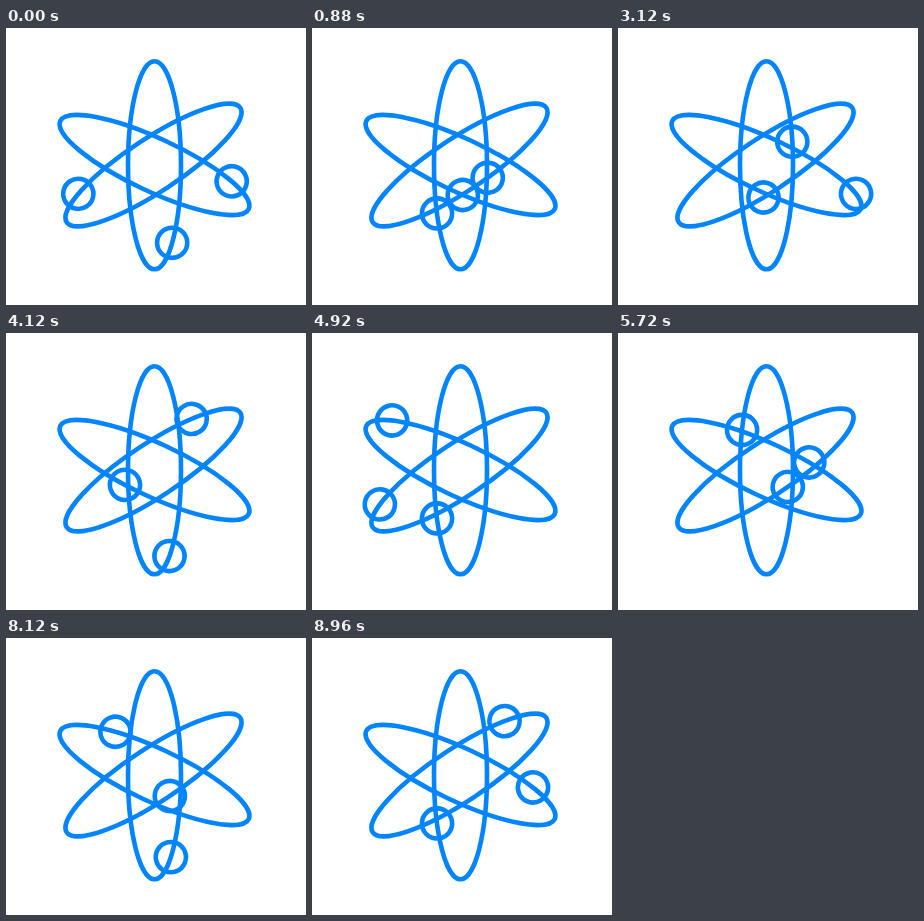
An HTML page that plays this animation: 300 by 277 pixels, repeating every 9000 ms.

```html
<!DOCTYPE html>
<html lang="en">
<head>
<meta charset="utf-8">
<title>Atom</title>
<style>
  html, body { margin: 0; width: 100%; height: 100%; overflow: hidden; background: #fff; }
  svg { display: block; width: 300px; height: 277px; fill: none; stroke: #0084ff; stroke-width: 4.6; }
</style>
</head>
<body>
<svg id="stage" viewBox="0 0 300 277"></svg>
<script>
const LOOP = 9000, STEP = 40;
const RX = 104, RY = 26.5, BALL = 15.1;

// turn: ms per revolution (negative runs anticlockwise); start: share of the path
const orbits = [
  { x: 148.5, y: 137.3, tilt: 90, turn: 4040, start: 0.9244 },
  { x: 148.5, y: 137, tilt: 25, turn: 3000, start: 0.923 },
  { x: 147.5, y: 137, tilt: -33.4, turn: -2440, start: 0.573 }
];

function add(parent, tag, attrs) {
  const el = document.createElementNS("http://www.w3.org/2000/svg", tag);
  for (const key in attrs) el.setAttribute(key, attrs[key]);
  return parent.appendChild(el);
}

const stage = document.getElementById("stage");

for (const o of orbits) {
  const group = add(stage, "g", { transform: `translate(${o.x} ${o.y}) rotate(${o.tilt})` });
  o.path = add(group, "ellipse", { rx: RX, ry: RY });
  o.ball = add(group, "circle", { r: BALL });
  o.length = o.path.getTotalLength();
}

// Balls travel at constant speed along the curve.
function draw() {
  const t = Math.floor(performance.now() % LOOP / STEP) * STEP;
  for (const o of orbits) {
    const laps = o.start + t / o.turn;
    const p = o.path.getPointAtLength((laps - Math.floor(laps)) * o.length);
    o.ball.setAttribute("cx", p.x);
    o.ball.setAttribute("cy", p.y);
  }
  requestAnimationFrame(draw);
}
draw();
</script>
</body>
</html>
```
